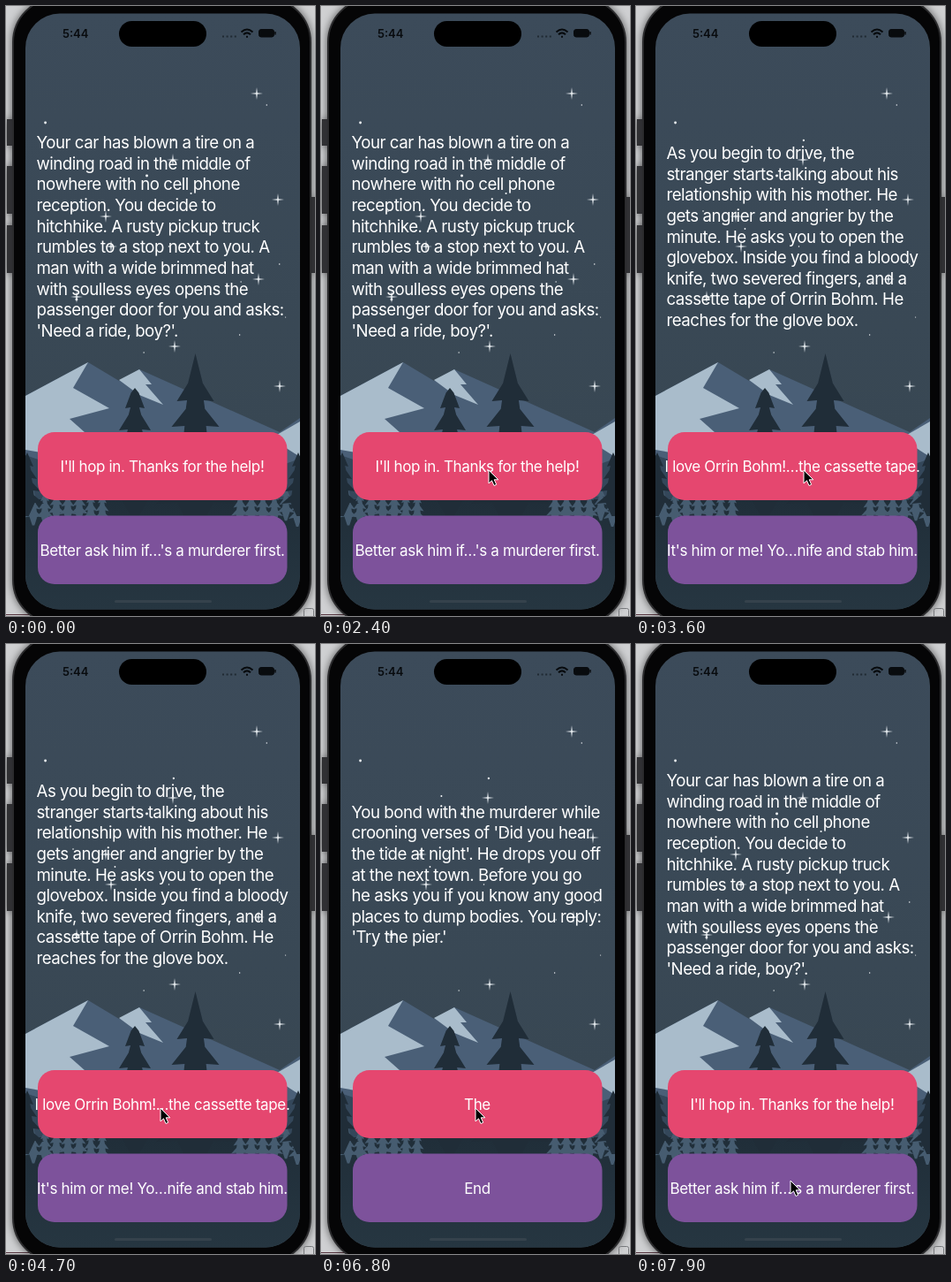
These frames come from a looping animation (350x690 px, 8000 ms). An HTML page:

```html
<!DOCTYPE html>
<html lang="en">
<head>
<meta charset="utf-8">
<title>Roadside story</title>
<style>
html, body { margin: 0; width: 100%; height: 100%; overflow: hidden; background: #cfd0d2; }
svg { display: block; width: 100vw; height: 100vh; }
text { font-family: Inter, Roboto, sans-serif; font-optical-sizing: none; fill: #fff; white-space: pre; }
#story { font-size: 18.7px; letter-spacing: -.5px; }
.label { font-size: 17px; letter-spacing: -.35px; text-anchor: middle; }
#clock { font-size: 13px; font-weight: 600; fill: #080b0e; }
#body { filter: drop-shadow(0 0 5px #0009); }
</style>
</head>
<body>
<svg viewBox="0 0 350 690">
  <defs>
    <linearGradient id="sky" x2="0" y2="1">
      <stop offset="0" stop-color="#3c4b5a"/>
      <stop offset=".7" stop-color="#384753"/>
    </linearGradient>
    <linearGradient id="ground" x2="0" y2="1">
      <stop offset="0" stop-color="#202e39"/>
      <stop offset="1" stop-color="#263641"/>
    </linearGradient>
    <clipPath id="screen"><rect x="22" y="8.5" width="311" height="674" rx="39"/></clipPath>
  </defs>

  <!-- desk and phone body -->
  <path d="M0 688.5H60" stroke="#54343e"/>
  <g id="body">
    <path d="M4 128v30m0 23v54m0 13v54M347 216v86" stroke="#303033" stroke-width="6"/>
    <rect x="8" y="-9" width="337" height="708" rx="50" fill="#050506" stroke="#2c2c2e" stroke-width="2"/>
  </g>
  <rect x="337.5" y="681.5" width="11" height="11" rx="2" fill="none" stroke="#77797c"/>

  <g clip-path="url(#screen)">
    <rect x="22" y="8" width="311" height="675" fill="url(#sky)"/>
    <path d="M22 441 93 403 128 424 151 411 310 482 333 466V570H22Z" fill="#4a5f77"/>
    <path d="M22 441 93 403 76 432 117 455 72 467 133 521 22 502Z
             M151 411l14 17h-7l20 23-27-11-23-17Z
             M333 470l-33 19 33 21Z" fill="#a9bccb"/>
    <path d="M22 508 130 545H240L333 512V600H22Z" fill="#34475a"/>
    <rect x="22" y="558" width="311" height="125" fill="url(#ground)"/>
    <path id="grove" fill="#465c70"/>
    <path id="pines" fill="#202d38"/>
    <path id="sparkles" fill="#e8edf1"/>
    <g id="dots" fill="#f2f5f7"></g>
    <rect x="123" y="672" width="110" height="3" rx="1.5" fill="#35424c"/>
  </g>

  <!-- status bar -->
  <rect x="128" y="17" width="99" height="29" rx="14.5"/>
  <text id="clock" x="64" y="36">5:44</text>
  <path d="M245 34.5h16" stroke="#202a33" stroke-width="2" stroke-dasharray="2 2.6"/>
  <g fill="none" stroke="#080b0e" stroke-width="2">
    <path d="M266.500 29.500q6.500-6 13 0M269 32.200q4-3.700 8 0M272 34.800h2"/>
    <rect x="286.500" y="26.500" width="17" height="8.500" rx="2.500" stroke-width="1" fill="#080b0e"/>
    <path d="M305 29v3.500" stroke-width="1.500"/>
  </g>

  <text id="story"></text>
  <rect id="red" x="36" y="482" width="282.500" height="77" rx="19" fill="#e5476f"/>
  <rect x="36" y="576.500" width="282.500" height="77.500" rx="19" fill="#7d529b"/>
  <text class="label" x="177" y="527"></text>
  <text class="label" x="177" y="622"></text>
  <path id="cursor" d="M0 0V15L3.500 11.800 6 17.500 8.700 16.300 6.200 10.800H10.800Z" stroke="#fff"/>
</svg>
<script>
const LOOP = 8000;
const $ = id => document.getElementById(id);
const clamp = v => Math.max(0, Math.min(1, v));
const random = n => { const v = Math.sin(n * 12.9898) * 43758.5453; return v - Math.floor(v); };

const scenes = [
  { lines: ["Your car has blown a tire on a", "winding road in the middle of",
      "nowhere with no cell phone", "reception. You decide to",
      "hitchhike. A rusty pickup truck", "rumbles to a stop next to you. A",
      "man with a wide brimmed hat", "with soulless eyes opens the",
      "passenger door for you and asks:", "'Need a ride, boy?'."],
    labels: ["I'll hop in. Thanks for the help!", "Better ask him if…'s a murderer first."] },
  { lines: ["As you begin to drive, the", "stranger starts talking about his",
      "relationship with his mother. He", "gets angrier and angrier by the",
      "minute. He asks you to open the", "glovebox. Inside you find a bloody",
      "knife, two severed fingers, and a", "cassette tape of Orrin Bohm. He",
      "reaches for the glove box."],
    labels: ["I love Orrin Bohm!…the cassette tape.", "It's him or me! Yo…nife and stab him."] },
  { lines: ["You bond with the murderer while", "crooning verses of 'Did you hear",
      "the tide at night'. He drops you off", "at the next town. Before you go",
      "he asks you if you know any good", "places to dump bodies. You reply:",
      "'Try the pier.'"],
    labels: ["The", "End"] }
];
const cuts = [
  { at: -1000, scene: 0 }, { at: 2900, scene: 1 }, { at: 4990, scene: 2 }, { at: 7000, scene: 0 }
];
// Each move starts where the one before it ended.
const moves = [
  { at: 1900, ms: 500, x: 190, y: 525 },
  { at: 3800, ms: 500, x: 175, y: 525 },
  { at: 7600, ms: 300, x: 175, y: 607 }
];

// Conifer: a concave tip, widening tiers and a trunk, drawn down the right side and up the left
function tree(x, y, first, step, w, grow, tiers) {
  const side = dir => {
    const points = [];
    for (let i = 0; i < tiers; i++) {
      const half = dir * (w + grow * i), base = y + first + step * i;
      points.push([x + half * .4, base - step * .7], [x + half, base], [x + half * .45, base - 1]);
    }
    points.push([x + dir * w * .25, y + first + step * tiers]);
    return points;
  };
  return `M${[[x, y], ...side(1), ...side(-1).reverse()].join(" ")}Z`;
}

let grove = "";
for (let x = 31; x < 333; x += 13)
  if (x < 110 || x > 252) grove += tree(x, 540 + 9 * random(x), 14, 9, 5, 2.5, 3);
$("grove").setAttribute("d", grove);
$("pines").setAttribute("d",
  tree(214.5, 393, 54, 29, 21, 6, 5) + tree(146, 432, 23, 25, 11, 7, 5) +
  tree(24, 505, 16, 14, 7, 4, 4) + tree(331, 505, 16, 14, 7, 4, 4));

const sparkle = ([x, y]) =>
  `M${x} ${y - 7}l.8 6.200 6.200.8-6.200.8-.8 6.200-.8-6.200-6.200-.8 6.200-.8Z`;
$("sparkles").setAttribute("d", [[284, 99], [189, 174], [308, 219], [113, 238], [119, 272],
  [286, 309], [80, 329], [191, 385], [310, 430]].map(sparkle).join(""));
for (let i = 1; i <= 15; i++)
  $("dots").innerHTML += `<circle cx="${28 + 290 * random(i)}" cy="${92 + 20 * i}" r="${.6 + random(i + 50)}"/>`;

const labels = document.querySelectorAll(".label");
let shown;
function show(scene) {
  if (scene === shown) return;
  shown = scene;
  const { lines, labels: words } = scenes[scene];
  const pitch = 23.66, top = 267.5 - (lines.length - 1) * pitch / 2;
  $("story").innerHTML = lines.map((s, i) => `<tspan x="34.5" y="${top + i * pitch}">${s}</tspan>`).join("");
  labels.forEach((el, i) => el.textContent = words[i]);
}

function draw(t) {
  const { at, scene } = cuts.findLast(c => t >= c.at);
  const fade = clamp((t - at) / 350);
  show(scene);
  labels.forEach(el => el.setAttribute("opacity", fade));
  $("red").setAttribute("opacity", .7 + .3 * clamp(fade * 1.6));

  let x = 225, y = 690;
  for (const m of moves) {
    const k = 1 - (1 - clamp((t - m.at) / m.ms)) ** 2;
    x += (m.x - x) * k;
    y += (m.y - y) * k;
  }
  $("cursor").setAttribute("transform", `translate(${x} ${y})`);
}

const begin = performance.now();
function tick() {
  draw((performance.now() - begin) % LOOP);
  requestAnimationFrame(tick);
}
tick();
</script>
</body>
</html>
```
